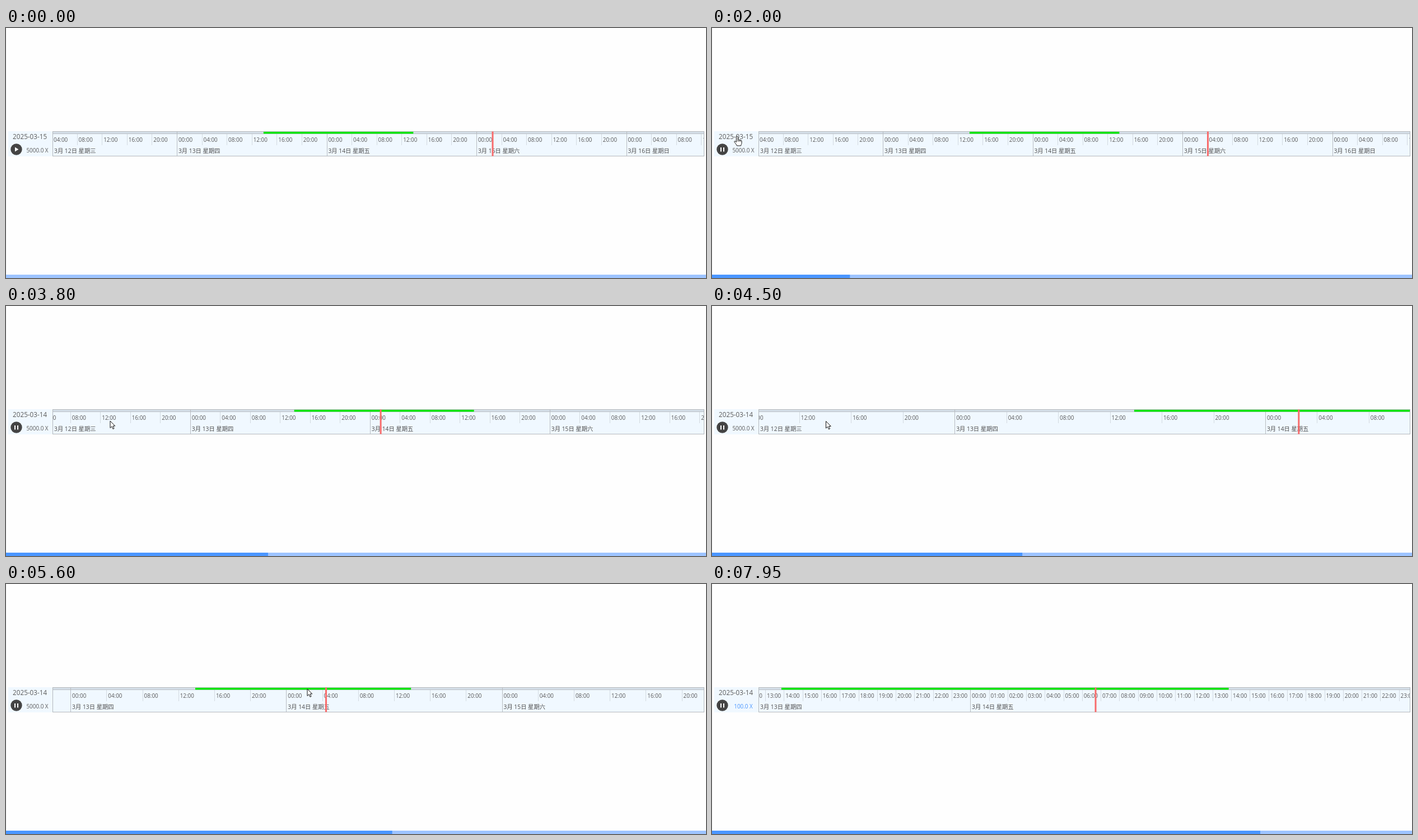
Recreate the animation shown at these times as an HTML page with a canvas. Size 1250x448 px, loop 8000 ms.

```html
<!DOCTYPE html>
<html lang="zh">
<head>
<meta charset="utf-8">
<style>
  html, body { margin: 0; width: 100%; height: 100%; overflow: hidden; background: #fefefe; }
  canvas { display: block; width: 1250px; height: 448px; }
</style>
</head>
<body>
<canvas id="stage"></canvas>
<script>
const W = 1250, H = 448, LOOP = 8000, STEP = 50;
const LEFT = 83.5, RIGHT = 1246.5, TOP = 185.5, BOTTOM = 229.5;
const BLUE = '#4a96ff', INK = '#5a5a5a', PANEL = '#f0f8ff';
const FONT = '"Open Sans", "Noto Sans CJK SC", "Noto Sans CJK", sans-serif';

const PLAY_AT = 1100, OPEN_AT = 2100, PICK_AT = 3200, HOVER_SPEED_AT = 6450;
const SPEEDS = ['5000.0 X', '1000.0 X', '100.0 X'];
const SPEED_STEPS = [[0, 0], [6700, 0], [6900, 1], [7650, 1], [7850, 2]];

// Playhead in hours since March 13, 00:00
const HEAD_BEFORE = [[0, 50.56], [PLAY_AT, 50.56], [PICK_AT, 54]];
const HEAD_AFTER = [[PICK_AT, 24.4], [6800, 30.4], [7650, 30.7], [LOOP, 30.71]];

// Wheel bursts: start, anchor x, direction, notches, interval
const ZOOMS = [
  [3800, 186, 1, 4, 100],
  [4600, 199, -1, 5, 80],
  [5400, 537.4, 1, 7, 75]
];

const MOUSE = [
  [150, 860, 450], [700, 60, 330], [850, 21, 215], [1350, 21, 215],
  [1700, 45, 194], [2150, 45, 194], [2850, 149, 68], [2950, 160, 65],
  [3450, 160, 65], [3800, 186, 206], [4000, 203.5, 206.5], [5000, 203.5, 206.5],
  [5300, 538, 188], [6000, 538, 188], [6500, 56, 216]
];

const ARROW = new Path2D('M0 0V12.5L2.9 9.8L5 14.4L7 13.5L5 9H8.8Z');
const HAND = new Path2D(
  'M-1.6 1.2C-1.6-.5 1.2-.5 1.2 1.2V6.6C1.5 5.4 3.6 5.6 3.7 7' +
  'C4.2 6 6 6.3 6 7.6C6.6 7 8 7.3 8 8.7V12.2C8 14 6.8 14.8 6.6 17H-.6' +
  'C-1 15-3 13-4.8 10.6C-5.8 9.2-4.2 8-3 9.2L-1.6 10.6Z');

const canvas = document.getElementById('stage');
const ctx = canvas.getContext('2d');
const ratio = window.devicePixelRatio || 1;
canvas.width = W * ratio;
canvas.height = H * ratio;

const clamp = (v, lo, hi) => Math.min(hi, Math.max(lo, v));

function sample(steps, t) {
  const next = steps.findIndex(s => s[0] > t);
  if (next < 0) return steps[steps.length - 1].slice(1);
  if (next === 0) return steps[0].slice(1);
  const a = steps[next - 1], b = steps[next];
  const p = (t - a[0]) / (b[0] - a[0]);
  return a.slice(1).map((v, i) => v + (b[i + 1] - v) * p);
}

function rect(x, y, w, h, color) {
  ctx.fillStyle = color;
  ctx.fillRect(x, y, w, h);
}

function roundRect(x, y, w, h, r) {
  ctx.beginPath();
  ctx.roundRect(x, y, w, h, r);
}

function line(x1, y1, x2, y2, color) {
  ctx.strokeStyle = color;
  ctx.lineWidth = 1;
  ctx.beginPath();
  ctx.moveTo(x1, y1);
  ctx.lineTo(x2, y2);
  ctx.stroke();
}

function text(str, x, y, size, color, align = 'left') {
  ctx.font = `${size}px ${FONT}`;
  ctx.textAlign = align;
  ctx.fillStyle = color;
  ctx.fillText(str, x, y);
}

function clipped(x, y, w, h, draw) {
  ctx.save();
  ctx.beginPath();
  ctx.rect(x, y, w, h);
  ctx.clip();
  draw();
  ctx.restore();
}

function viewAt(t) {
  let origin = 305.5, level = 0;
  for (const [start, anchor, dir, count, every] of ZOOMS) {
    const notches = clamp(Math.floor((t - start) / every) + 1, 0, count);
    origin = anchor - (anchor - origin) * 1.2 ** (dir * notches);
    level += dir * notches;
  }
  const perHour = 11.146 * 1.2 ** level;
  return { step: level > 5 ? 1 : 4, x: hour => origin + hour * perHour };
}

function drawTimeline(t) {
  const { step, x } = viewAt(t);
  const snap = v => Math.floor(v) + 0.5;
  rect(LEFT, TOP, RIGHT - LEFT, BOTTOM - TOP, PANEL);
  rect(LEFT, TOP, RIGHT - LEFT, 4.5, '#d5dfe8');
  line(LEFT, 189.5, RIGHT, 189.5, '#b9bfc5');

  clipped(84, 185, 1162.5, 45, () => {
    for (let hour = -72; hour <= 144; hour += step) {
      const tick = x(hour);
      if (tick < 40 || tick > RIGHT) continue;
      const label = String((hour + 72) % 24).padStart(2, '0') + ':00';
      if (hour % 24) line(snap(tick), 190, snap(tick), 210, '#d3dae0');
      text(label, tick + 2.4, 204.3, 9.9, INK);
    }
    for (let day = -3; day < 7; day++) {
      const tick = x(day * 24), end = x(day * 24 + 24);
      if (end < LEFT || tick > RIGHT) continue;
      line(snap(tick), TOP, snap(tick), BOTTOM, '#b8bcc0');
      const labelX = Math.max(tick + 2.4, 86);
      const date = 13 + day, weekday = '日一二三四五六'[(date + 5) % 7];
      if (end - labelX > 74) text(`3月 ${date}日 星期${weekday}`, labelX, 224.2, 10.3, '#4d4d4d');
    }
    rect(x(13.85), 185.5, x(37.85) - x(13.85), 4, '#0be60b');
  });

  ctx.strokeStyle = '#b4b8bc';
  ctx.lineWidth = 1;
  ctx.strokeRect(LEFT, TOP, RIGHT - LEFT, BOTTOM - TOP);
  const [head] = sample(t < PICK_AT ? HEAD_BEFORE : HEAD_AFTER, t);
  rect(x(head) - 1.5, 185.5, 3, 44, '#f86c6c');
}

function drawControls(t, overButton) {
  rect(4, 185, 79, 45, PANEL);
  text(t < PICK_AT ? '2025-03-15' : '2025-03-14', 42.6, 198.5, 11.7, INK, 'center');

  ctx.fillStyle = overButton ? BLUE : '#444';
  ctx.beginPath();
  ctx.arc(18.5, 217.5, 10.2, 0, Math.PI * 2);
  ctx.fill();
  if (t < PLAY_AT) {
    ctx.fillStyle = '#fff';
    ctx.fill(new Path2D('M16 213.5L22.4 217.5L16 221.5Z'));
  } else {
    rect(15, 214, 2, 7.5, '#fff');
    rect(20, 214, 2, 7.5, '#fff');
  }

  const [scroll] = sample(SPEED_STEPS, t);
  const color = t < HOVER_SPEED_AT ? INK : BLUE;
  clipped(30, 207, 53, 23, () => SPEEDS.forEach((speed, i) =>
    text(speed, 56, 222.8 + (scroll - i) * 21, 9.9, color, 'center')));
}

function drawCalendar(t, mouse) {
  const show = t < PICK_AT ? clamp((t - OPEN_AT) / 200, 0, 1) : clamp(1 - (t - PICK_AT) / 150, 0, 1);
  if (!show) return;
  const ease = 1 - (1 - show) ** 2, zoom = 0.9 + 0.1 * ease;
  ctx.save();
  ctx.globalAlpha = ease;
  ctx.translate(5, 183);
  ctx.scale(zoom, zoom);
  ctx.translate(-5, -183);

  ctx.save();
  ctx.shadowColor = 'rgba(0,0,0,.16)';
  ctx.shadowBlur = 14 * ratio;
  ctx.shadowOffsetY = 3 * ratio;
  ctx.fillStyle = '#fff';
  roundRect(5, -80, 208, 263, 4);
  ctx.fill();
  ctx.restore();

  const picked = t < PICK_AT ? 20 : 19;
  for (let i = 0; i < 42; i++) {
    const day = i < 6 ? 23 + i : i < 37 ? i - 5 : i - 36;
    const x = 26.6 + (i % 7) * 26.75, y = 17 + Math.floor(i / 7) * 23.8;
    const enabled = i >= 19 && i <= 21;
    if (!enabled) rect(x - 13.6, y - 9.5, 27, 19, '#f3f3f4');
    const hovered = Math.hypot(mouse[0] - x, mouse[1] - y) < 9;
    if (i === picked || (enabled && hovered)) {
      ctx.fillStyle = i === picked ? BLUE : '#f3f3f5';
      roundRect(x - 9, y - 9, 18, 18, 2.5);
      ctx.fill();
    }
    if (i === 18) {
      ctx.strokeStyle = '#b9b9b9';
      roundRect(x - 8.5, y - 8.5, 17, 17, 2);
      ctx.stroke();
    }
    text(day, x, y + 3.7, 10, i === picked ? '#fff' : enabled ? '#222' : '#bdbdbd', 'center');
  }
  line(5, 154.5, 213, 154.5, '#efeff2');
  text('Today', 108.5, 172.5, 9.9, BLUE, 'center');
  ctx.restore();
}

function drawPointer(t, [x, y], hand) {
  if (t < MOUSE[0][0] || t > 6500) return;
  const shape = hand ? HAND : ARROW;
  ctx.save();
  ctx.translate(x, y);
  ctx.fillStyle = '#fff';
  ctx.strokeStyle = '#111';
  ctx.lineWidth = 1;
  ctx.lineJoin = 'round';
  ctx.fill(shape);
  ctx.stroke(shape);
  if (hand) for (const fx of [1.2, 3.7, 6]) line(fx, 7, fx, 9.5, '#111');
  ctx.restore();
}

function draw(t) {
  const mouse = sample(MOUSE, t), [mx, my] = mouse;
  const overButton = Math.hypot(mx - 18.5, my - 217.5) < 10.5;
  const overDate = mx < 80 && my > 186 && my < 204;
  const overCalendar = t > OPEN_AT && t < PICK_AT && my < 183;

  ctx.setTransform(ratio, 0, 0, ratio, 0, 0);
  rect(0, 0, W, H, '#fefefe');
  rect(0, 0, 1, 442, '#f4f4f4');
  drawTimeline(t);
  drawControls(t, overButton);
  drawCalendar(t, mouse);
  rect(0, 442, W, 6, '#9dc4ff');
  rect(0, 442, t * 0.12315, 6, BLUE);
  drawPointer(t, mouse, overButton || overDate || overCalendar);
}

const start = performance.now();
function frame() {
  const t = (performance.now() - start) % LOOP;
  draw(Math.floor(t / STEP) * STEP);
  requestAnimationFrame(frame);
}
frame();
</script>
</body>
</html>
```
